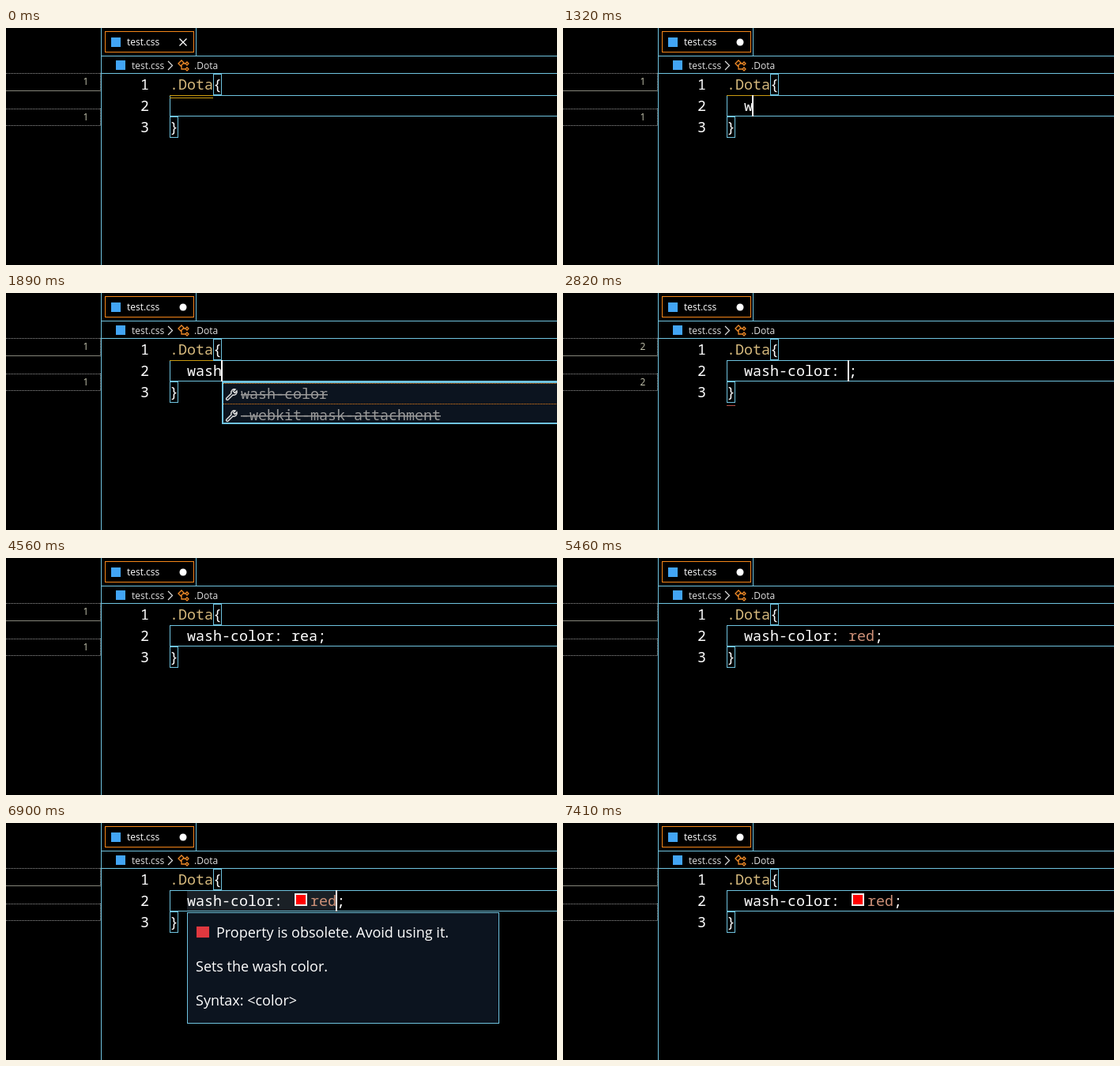
Animation of 697x300 px, one loop 7.68 s. Source, as an HTML page with a canvas:

```html
<!DOCTYPE html>
<html lang="en">
<head>
<meta charset="utf-8">
<title>Editor</title>
<style>
html, body { margin: 0; width: 100%; height: 100%; overflow: hidden; background: #000; }
canvas { display: block; width: 697px; height: 300px; }
</style>
</head>
<body>
<canvas id="stage" width="697" height="300"></canvas>
<script>
const ctx = document.getElementById('stage').getContext('2d');
const LOOP = 7680, CHAR = 11, ROW = 27, CODE_X = 207, TEXT_X = 229, SWATCH_W = 24;
const MONO = '18.33px "Noto Sans Mono", "DejaVu Sans Mono", monospace';
const UI = '12px "Open Sans", "Noto Sans", sans-serif';
const BLUE = '#6fc3df', ORANGE = '#f38518', YELLOW = '#c99a10', RED = '#b5534b', GOLD = '#d7ba7d', ICON = '#42a5f5';

const LISTS = {
  w: ['~wash-color', 'width', 'word-wrap', 'word-break', 'will-change', 'white-space', 'word-spacing'],
  wa: ['~wash-color', 'word-wrap', 'will-change', 'word-spacing', '-webkit-animation',
    '-webkit-animation-delay', '-webkit-animation-direction'],
  was: ['~wash-color', '-webkit-mask', '-webkit-mask-clip', '-webkit-mask-size', '-webkit-mask-image',
    '-webkit-mask-origin', '-webkit-mask-repeat'],
  wash: ['~wash-color', '~-webkit-mask-attachment']
};

// Each step changes part of the state: [time in ms, changes].
const STEPS = [
  [0, { name: '', value: '', end: '', caret: false, count: '1', warn: 2, error: '', list: '', hover: 0 }],
  [420, { caret: true }],
  [930, { caret: false }],
  [1320, { name: 'w', caret: true, dirty: true, warn: 1 }],
  [1410, { list: 'w' }],
  [1500, { name: 'wa', list: 'wa' }],
  [1680, { name: 'was', list: 'was' }],
  [1890, { name: 'wash', list: 'wash' }],
  [2340, { caret: false }],
  [2430, { warn: 0, error: 'brace' }],
  [2490, { count: '2' }],
  [2820, { name: 'wash-color: ', end: ';', list: '', caret: true }],
  [3300, { caret: false }],
  [3420, { count: '1', error: 'end' }],
  [3660, { value: 'r', caret: true }],
  [3780, { value: 're' }],
  [4080, { value: 'rea' }],
  [4560, { caret: false, error: '' }],
  [4650, { count: '' }],
  [4830, { value: 're', caret: true }],
  [5010, { value: 'red' }],
  [5460, { caret: false }],
  [5820, { swatch: true }],
  [5970, { caret: true }],
  [6420, { mark: true }],
  [6480, { caret: false, hover: 0.33 }],
  [6510, { hover: 0.67 }],
  [6540, { hover: 1 }],
  [6900, { caret: true }],
  [7050, { mark: false, hover: 0 }],
  [7410, { caret: false }]
];

function rect(x, y, w, h, color) {
  ctx.fillStyle = color;
  ctx.fillRect(x, y, w, h);
}

function box(x, y, w, h, color, line = 1) {
  ctx.strokeStyle = color;
  ctx.lineWidth = line;
  ctx.strokeRect(x + line / 2, y + line / 2, w - line, h - line);
}

function text(str, x, y, color = '#fff', font = MONO) {
  ctx.font = font;
  ctx.fillStyle = color;
  ctx.fillText(str, x, y);
}

function path(d, color, line, x = 0, y = 0) {
  ctx.save();
  ctx.translate(x, y);
  ctx.strokeStyle = color;
  ctx.lineWidth = line;
  ctx.stroke(new Path2D(d));
  ctx.restore();
}

function dots(d, color) {
  ctx.setLineDash([1, 1]);
  path(d, color, 1);
  ctx.setLineDash([]);
}

function drawSidebar(count) {
  dots('M0 57.5H120M119.5 57V79M0 102.5H120M119.5 102V124M0 123.5H120', '#999');
  rect(0, 79, 120, 1, '#85857a');
  text(count, 97.5, 72, '#c5c5b0', UI);
  text(count, 97.5, 117, '#c5c5b0', UI);
}

function drawHeader(dirty) {
  rect(120, 0, 1, 300, BLUE);
  rect(240, 0, 1, 36, BLUE);
  rect(120, 35, 577, 1, BLUE);
  rect(120, 57, 577, 1, BLUE);
  box(125, 4, 113, 27, ORANGE);
  rect(133, 12, 12, 12, ICON);
  rect(139, 41, 12, 12, ICON);
  text('test.css', 153, 22, '#fff', UI);
  text('test.css', 159, 52, '#e0e0e0', UI);
  text('.Dota', 238, 52, '#e0e0e0', UI);
  path('M205 42l5.5 5.5-5.5 5.5', '#ddd', 1.2);
  path('M218 45l4-4 3 3-4 4zM224 45h3M222 47v5h5M227 45l2-2 2 2-2 2zM227 52l2-2 2 2-2 2z', '#ee8a28', 1.3);
  if (dirty) {
    ctx.fillStyle = '#fff';
    ctx.beginPath();
    ctx.arc(224, 18, 4.5, 0, 7);
    ctx.fill();
  } else {
    path('M219.5 13.5l9 9m0-9l-9 9', '#fff', 1.3);
  }
}

function drawCode(s) {
  const shift = s.swatch ? SWATCH_W : 0;
  const valueX = TEXT_X + s.name.length * CHAR + shift;
  const caretX = valueX + s.value.length * CHAR;

  for (let i = 0; i < 3; i++) text(i + 1, 170, 78 + i * ROW);
  box(CODE_X, 85, 500, 27, BLUE);
  if (s.warn) rect(CODE_X, 85, 55, 1, YELLOW);
  if (s.warn > 1) rect(CODE_X, 88, 55, 1, YELLOW);
  if (s.mark) rect(TEXT_X, 86, caretX - TEXT_X, 25, '#1a2026');

  box(262, 58, 11, 27, BLUE);
  box(CODE_X, 112, 11, 27, BLUE);
  text('.Dota', CODE_X, 78, GOLD);
  text('{', 262, 78);
  text('}', CODE_X, 132);
  text(s.name, TEXT_X, 105);
  text(s.value, valueX, 105, s.value === 'red' ? '#ce9178' : '#fff');
  text(s.end, caretX, 105);

  if (s.error === 'brace') rect(CODE_X, 142, 11, 1, RED);
  if (s.error === 'end') rect(caretX, 115, 11, 1, RED);
  if (s.swatch) {
    rect(365, 89, 16, 16, '#eee');
    rect(367, 91, 12, 12, '#f00');
  }
  if (s.caret) rect(caretX - 1, 85, 2, 27, '#fff');
}

function drawItem(item, query, x, y) {
  const old = item[0] === '~';
  const label = old ? item.slice(1) : item;
  path('M1 12l6-6a4 4 0 0 1 5-5l-2.5 2.5 2 2L14 3a4 4 0 0 1-5 5l-6 6a1.4 1.4 0 0 1-2-2z', '#ddd', 1.5, x + 5, y - 13);
  let hit = 0;
  [...label].forEach((c, i) => {
    const match = !old && c === query[hit];
    if (match) hit++;
    text(c, x + 24 + i * CHAR, y, old ? '#999' : match ? ORANGE : '#fff', (match ? 'bold ' : '') + MONO);
  });
  if (old) rect(x + 24, y - 6, label.length * CHAR, 1.5, '#999');
}

function drawList(query) {
  const x = TEXT_X + query.length * CHAR;
  const items = LISTS[query];
  const h = items.length * ROW;
  rect(x, 112, 430, h, '#0c141f');
  items.forEach((item, i) => drawItem(item, query, x, 134 + i * ROW));
  dots(`M${x + 2} 114.5h426M${x + 2} 140.5h426`, ORANGE);
  box(x, 112, 430, h, BLUE, 2);
}

function drawHover(alpha) {
  ctx.globalAlpha = alpha;
  rect(TEXT_X, 113, 395, 141, '#0c141f');
  box(TEXT_X, 113, 395, 141, BLUE);
  const lines = ['Property is obsolete. Avoid using it.', 'Sets the wash color.', 'Syntax: <color>'];
  lines.forEach((line, i) => text(line, i ? 240 : 266, 145 + i * 43, '#fff', UI.replace('12px', '18px')));
  rect(241, 131, 16, 14, '#e0383f');
  ctx.globalAlpha = 1;
}

function draw(now) {
  const t = now % LOOP;
  const s = Object.assign({}, ...STEPS.filter(([at]) => at <= t).map(([, change]) => change));
  rect(0, 0, 697, 300, '#000');
  drawSidebar(s.count);
  drawHeader(s.dirty);
  drawCode(s);
  if (s.list) drawList(s.list);
  if (s.hover) drawHover(s.hover);
  requestAnimationFrame(draw);
}

draw(performance.now());
</script>
</body>
</html>
```
